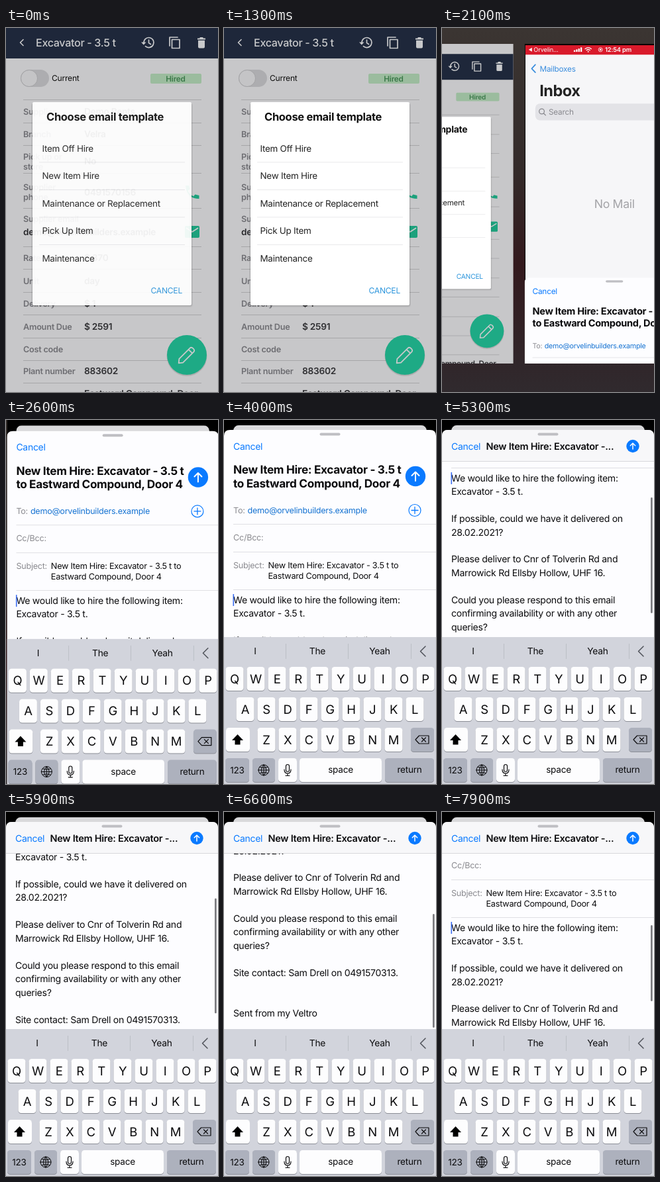
An HTML page that plays this animation: 320 by 550 pixels, repeating every 8 s.

```html
<!DOCTYPE html>
<html lang="en">
<head>
<meta charset="utf-8">
<title>Hire request email</title>
<style>
html, body { margin: 0; width: 100%; height: 100%; overflow: hidden; background: #000; }
svg { display: block; width: 100%; height: 100%; }
text { font-family: Inter, Roboto, sans-serif; letter-spacing: -.02em; text-rendering: geometricPrecision; }
</style>
</head>
<body>
<svg id="stage" viewBox="0 0 320 550"></svg>
<script>
const LOOP = 8000;
const BLUE = '#0a7aff', GREY = '#8b8b90', INK = '#0b0b0d';

// y is the vertical middle of the capitals
const text = (x, y, s, size, fill = INK, weight = 400, anchor = 'start') =>
  `<text x="${x}" y="${(y + size * .36).toFixed(2)}" font-size="${size}" fill="${fill}" font-weight="${weight}" text-anchor="${anchor}">${s}</text>`;
const rect = (x, y, w, h, fill, r = 0, extra = '') =>
  `<rect x="${x}" y="${y}" width="${w}" height="${h}" rx="${r}" fill="${fill}" ${extra}/>`;
const circle = (x, y, r, fill) => `<circle cx="${x}" cy="${y}" r="${r}" fill="${fill}"/>`;
const stroke = (d, color, width = 1.5, fill = 'none') =>
  `<path d="${d}" fill="${fill}" stroke="${color}" stroke-width="${width}" stroke-linecap="round" stroke-linejoin="round"/>`;
const shape = (d, fill) => `<path d="${d}" fill="${fill}"/>`;
const at = (x, y, body) => `<g transform="translate(${x} ${y})">${body}</g>`;
const group = (id, body, extra = '') => `<g id="${id}" ${extra}>${body}</g>`;

function hirePage() {
  const green = '#22c497', white = '#f4f5f7';
  const rows = [
    [126, 'Supplier', 'Demo Rents'], [160, 'Branch', 'Velra'], [201, '', 'No'],
    [248, '', '0491570156'], [347, 'Rate', '$ 370'], [382, 'Unit', 'day'],
    [416, 'Delivery', '$ 1'], [451, 'Amount Due', '$ 2591'], [485, 'Cost code', ''],
    [518, 'Plant number', '883602'], [552, '', 'Eastward Compound, Door']
  ];
  const labels = [[194, 'Pick up or'], [209, 'store'], [240, 'Supplier'], [255, 'phone'], [288, 'Supplier email']];
  const lines = [108, 143, 177, 219, 272, 330, 364, 399, 433, 468, 502, 536];
  const label = (y, s) => text(26, y, s, 12.7, '#85858b', 600);
  return rect(0, -18, 320, 570, '#f3f3f5')
    + rect(0, 0, 320, 46, '#253047')
    + stroke('M26 17.5L21.5 22L26 26.5', white, 1.6)
    + text(45, 22, 'Excavator - 3.5 t', 16.1, white, 500)
    + at(214, 22, stroke('M-6 0A7.5 7.5 0 1 1 -3.5 5.6M1.5 -4V.5L4.5 2.5', white, 1.7) + shape('M-10 -.5H-2.5L-6.2 3.6Z', white))
    + at(255, 22, stroke('M-8 5V-8H4M-4.5 -4.5H7V8.5H-4.5Z', white, 1.7))
    + at(295, 22, shape('M-6 -6.5H-3L-2 -8H2L3 -6.5H6V-4.5H-6ZM-5 -3.2H5V6.5Q5 8.5 3 8.5H-3Q-5 8.5 -5 6.5Z', white))
    + rect(22, 63, 43, 26, '#d3d3d6', 13) + circle(35, 76, 12.5, '#efeff1')
    + `<circle cx="35" cy="76" r="12.5" fill="none" stroke="#bebec2" stroke-width=".8"/>`
    + text(69, 76, 'Current', 12.1, '#111')
    + rect(218, 69, 77, 15, '#bde5c0', 2) + text(256, 76.5, 'Hired', 11.8, '#479359', 600, 'middle')
    + lines.map(y => rect(26, y, 269, 1, '#cacacd')).join('')
    + labels.map(r => label(...r)).join('')
    + rows.map(([y, a, b]) => label(y, a) + text(118, y, b, 13.7, '#39393d', 600)).join('')
    + text(26, 308, 'demo@orvelinbuilders.example', 13.5, '#303034', 600)
    + at(281, 248, shape('M-10 -10H-5L-3.5 -4.5L-6.5 -2Q-4 3.5 2 6.3L4.5 3.5L10.5 5V10Q-8.5 10 -10 -10Z', green))
    + rect(270, 299, 22, 18, green, 2) + stroke('M272.5 302.5L281 308L289.5 302.5', '#f3f3f5', 1.8)
    + circle(273, 495.5, 30.5, 'rgba(0,0,0,.13)') + circle(273, 494, 30, '#25cfa2')
    + at(272, 495, `<g transform="rotate(45)">${stroke('M-4 -12Q-4 -15 0 -15Q4 -15 4 -12V11L0 16L-4 11ZM-4 -9H4', white, 1.8)}</g>`)
    + rect(0, -18, 320, 570, 'rgba(0,0,0,.18)');
}

function dialog() {
  const items = ['Item Off Hire', 'New Item Hire', 'Maintenance or Replacement', 'Pick Up Item', 'Maintenance'];
  return rect(38, 114, 244, 308, 'rgba(0,0,0,.05)', 4) + rect(39, 113, 242, 307.5, 'rgba(0,0,0,.1)', 3)
    + rect(40, 112, 240, 307, '#fff', 2)
    + text(61, 134.5, 'Choose email template', 16.5, '#111', 700)
    + items.map((s, i) => text(54.5, 182 + i * 41.5, s, 13.45, '#222')
      + (i < 4 ? rect(50, 202.5 + i * 41.5, 220, .8, '#e4e4e6') : '')).join('')
    + text(266, 396.5, 'CANCEL', 12.1, '#2b95dc', 400, 'end');
}

function mailbox() {
  const bars = [3, 4.5, 6, 8].map((h, i) => rect(87 + i * 4, -6 - h, 2.8, h, '#fff', .5)).join('');
  const status = rect(0, -18, 320, 17, '#dc1a2c')
    + shape('M6 -10L12 -13.5V-6.5Z', '#fff') + text(15, -10, 'Orvelin...', 11, '#fff') + bars
    + stroke('M107.5 -11.5Q113 -16 118.5 -11.5M110 -9Q113 -11.5 116 -9', '#fff', 1.6) + circle(113, -6.5, 1.2, '#fff')
    + `<circle cx="135" cy="-10" r="3.6" fill="none" stroke="#fff"/>` + circle(135, -10, 1.7, '#fff')
    + text(143, -10, '12:54 pm', 11.2, '#fff', 600);
  return rect(0, -18, 320, 570, '#f9f9fb')
    + group('status', status)
    + stroke('M18 17L11.5 24L18 31', '#3b8fe0', 2) + text(26, 24, 'Mailboxes', 14, '#3b8fe0')
    + text(25.5, 63, 'Inbox', 28, '#222', 700)
    + rect(18, 87, 284, 30, '#e6e6ea', 8)
    + `<circle cx="29.5" cy="101" r="4.6" fill="none" stroke="#88888d" stroke-width="1.5"/>`
    + stroke('M33 104.5L36.5 108', '#88888d', 1.5) + text(42, 102, 'Search', 14, GREY)
    + text(160, 267.5, 'No Mail', 21, '#a5a5a9', 400, 'middle')
    + rect(0, -18, 320, 570, '#000', 0, 'id="shade"');
}

function message() {
  const body = [
    'We would like to hire the following item:', 'Excavator - 3.5 t.', '',
    'If possible, could we have it delivered on', '28.02.2021?', '',
    'Please deliver to Cnr of Tolverin Rd and', 'Marrowick Rd Ellsby Hollow, UHF 16.', '',
    'Could you please respond to this email', 'confirming availability or with any other', 'queries?', '',
    'Site contact: Sam Drell on 0491570313.', '', '', 'Sent from my Veltro'
  ];
  return text(14, 75, 'New Item Hire: Excavator - 3.5 t', 17.2, INK, 700)
    + text(14, 95.5, 'to Eastward Compound, Door 4', 17.2, INK, 700)
    + group('bigSend', circle(289, 85, 15.2, BLUE) + stroke('M289 92V78.5M283.5 84L289 78.5L294.5 84', '#fff', 2))
    + text(14, 136, 'To:', 12.6, GREY) + text(35.5, 136, 'demo@orvelinbuilders.example', 12.6, '#1673d2')
    + `<circle cx="288" cy="136.5" r="9" fill="none" stroke="${BLUE}" stroke-width="1.2"/>`
    + stroke('M283 136.5H293M288 131.5V141.5', BLUE, 1.3)
    + text(14, 177.5, 'Cc/Bcc:', 12.6, GREY) + text(14, 219, 'Subject:', 12.6, GREY)
    + text(66.5, 219, 'New Item Hire: Excavator - 3.5 t to', 12.7)
    + text(66.5, 235, 'Eastward Compound, Door 4', 12.7)
    + [157, 199, 256].map(y => rect(14, y, 306, .8, '#d9d9dd')).join('')
    + body.map((s, i) => s && text(14, 271.6 + i * 20.47, s, 14.08)).join('')
    + rect(13.5, 263, 1.6, 18, '#3a6cf0');
}

function keyboard() {
  const key = (x, y, w, fill = '#fdfdfe') => rect(x, y + 1, w, 36, '#8b8e96', 4.5) + rect(x, y, w, 36, fill, 4.5);
  const soft = '#adb1bd';
  const letters = (s, x, y) => [...s].map((c, i) =>
    key(x + i * 32 - 13.5, y, 27) + text(x + i * 32, y + 18, c, 18.5, INK, 400, 'middle')).join('');
  return rect(0, 328, 320, 226, '#d2d4dc')
    + ['I', 'The', 'Yeah'].map((s, i) => text(47 + i * 94, 349.5, s, 13.8, INK, 400, 'middle')).join('')
    + [93, 187, 282].map(x => rect(x, 338, .8, 23, '#b7bac1')).join('')
    + stroke('M304 342L296.5 349.5L304 357', '#50535a', 1.5)
    + letters('QWERTYUIOP', 16, 373) + letters('ASDFGHJKL', 32, 419) + letters('ZXCVBNM', 64, 465)
    + key(3, 465, 36) + shape('M20.5 475L29 484H24.5V490.5H16.5V484H12Z', '#000')
    + key(282, 465, 35, soft) + stroke('M289 483L294.5 477H309V489H294.5ZM298.5 480L304.5 486M304.5 480L298.5 486', INK, 1.2)
    + key(2, 511, 36, soft) + text(20, 529, '123', 13.5, INK, 400, 'middle')
    + key(43, 511, 34, soft)
    + at(60, 529, stroke('M-8 0A8 8 0 1 1 8 0A8 8 0 1 1 -8 0ZM0 -8V8M-8 0H8M0 -8Q-8 0 0 8M0 -8Q8 0 0 8M-6 -4.5Q0 -2 6 -4.5M-6 4.5Q0 2 6 4.5', INK, 1))
    + key(82, 511, 28)
    + at(96, 529, stroke('M-2.5 -6Q-2.5 -8.5 0 -8.5Q2.5 -8.5 2.5 -6V0Q2.5 2.5 0 2.5Q-2.5 2.5 -2.5 0ZM-5 -1Q-5 5 0 5Q5 5 5 -1M0 5V8.5M-3 8.5H3', INK, 1.2))
    + key(114, 511, 124) + text(176, 528.5, 'space', 13.6, INK, 400, 'middle')
    + key(243, 511, 74, soft) + text(280, 528.5, 'return', 13.6, INK, 400, 'middle');
}

function composer() {
  const top = 'V24Q0 15 9 15H311Q320 15 320 24V';
  return shape(`M0 560${top}560Z`, '#fdfdff')
    + `<g clip-path="url(#view)">${group('scroll', message())}</g>`
    + group('bar', shape(`M0 62${top}62Z`, '#f7f7f9')
      + text(66.5, 39.5, 'New Item Hire: Excavator -...', 14.55, INK, 600)
      + circle(288, 39.5, 9.7, BLUE) + stroke('M288 44V35M284.3 38.7L288 35L291.7 38.7', '#fff', 1.5)
      + rect(0, 62, 320, .8, '#d0d0d4'))
    + rect(144.5, 19.5, 31, 4, '#bfbfc3', 2)
    + text(14, 39.5, 'Cancel', 14, BLUE)
    + rect(315, 0, 2.8, 10, '#7c7c80', 1.4, 'id="thumb"');
}

const stage = document.getElementById('stage');
stage.innerHTML = `<defs>
  <clipPath id="screen"><rect x="0" y="-18" width="320" height="570"/></clipPath>
  <clipPath id="round"><rect id="corner" x="0" y="-18" width="320" height="570"/></clipPath>
  <clipPath id="view"><rect x="0" y="62" width="320" height="490"/></clipPath>
  <linearGradient id="wall" x1="0" y1="0" x2="0" y2="1">
    <stop offset="0" stop-color="#3b3532"/><stop offset=".4" stop-color="#332a29"/>
    <stop offset=".65" stop-color="#33191d"/><stop offset="1" stop-color="#302a2e"/>
  </linearGradient></defs>`
  + rect(0, 0, 320, 550, 'url(#wall)')
  + group('hire', hirePage() + group('dialog', dialog()), 'clip-path="url(#screen)"')
  + group('mail', rect(0, -18, 320, 570, '#000') + group('inbox', mailbox(), 'clip-path="url(#round)"')
    + group('sheet', composer()) + group('keys', keyboard()), 'clip-path="url(#screen)"');

const el = {};
stage.querySelectorAll('[id]').forEach(n => el[n.id] = n);
const set = (n, a) => { for (const k in a) n.setAttribute(k, a[k]); };
const clamp = v => Math.max(0, Math.min(1, v));

// critically damped spring from 0 to 1
function spring(t, start, speed) {
  const x = Math.max(0, t - start) / 1000 * speed;
  return 1 - (1 + x) * Math.exp(-x);
}

// time, scroll offset, thumb top, thumb bottom
const track = [
  [4250, 0, 66, 240], [4950, 184, 117, 292], [5600, 184, 117, 292],
  [6300, 295, 154, 326], [6950, 295, 154, 326], [7850, 97, 171, 286]
];
function sample(t) {
  const i = track.findIndex(k => k[0] > t);
  if (i === 0) return track[0];
  if (i < 0) return track[track.length - 1];
  const a = track[i - 1], b = track[i];
  const u = (t - a[0]) / (b[0] - a[0]);
  const e = 1 - (1 - u * u) ** 2.2;
  return a.map((v, j) => v + (b[j] - v) * e);
}

function card(n, slot, p) {
  const s = 1 - .172 * Math.sin(Math.PI * p);
  const x = 160 + (slot - p) * 340 * s - 160 * s;
  set(n, { transform: `translate(${x} ${257 * (1 - s)}) scale(${s})`, display: x > 320 || x < -320 ? 'none' : 'inline' });
}

function draw(t) {
  const swap = spring(t, 1903, 11.25);
  card(el.hire, 0, swap);
  card(el.mail, 1, swap);
  set(el.dialog, { opacity: .93 + .07 * clamp(t / 400) });

  // the inbox shrinks to a rounded card behind the rising sheet
  const rise = spring(t, 2025, 14.5);
  const back = rise * rise, k = 1 - .0875 * back;
  set(el.inbox, { transform: `translate(${14 * back} ${-18 + 26 * back + 18 * k}) scale(${k})` });
  set(el.corner, { rx: 9 * back });
  set(el.status, { opacity: 1 - clamp(rise * 2 - .8) });
  set(el.shade, { opacity: .13 * back });
  set(el.sheet, { transform: `translate(0 ${550 * (1 - rise)})` });
  set(el.keys, { transform: `translate(0 ${226 * (1 - spring(t, 2150, 14))})` });

  const [, y, top, bottom] = sample(t);
  const small = clamp((y - 18) / 24);
  set(el.scroll, { transform: `translate(0 ${-y})` });
  set(el.bar, { opacity: small });
  set(el.bigSend, { opacity: 1 - small });
  set(el.thumb, { y: top, height: bottom - top, opacity: clamp((t - 4250) / 150) });
}

function tick(now) {
  draw(now % LOOP);
  requestAnimationFrame(tick);
}
draw(0);
requestAnimationFrame(tick);
</script>
</body>
</html>
```
